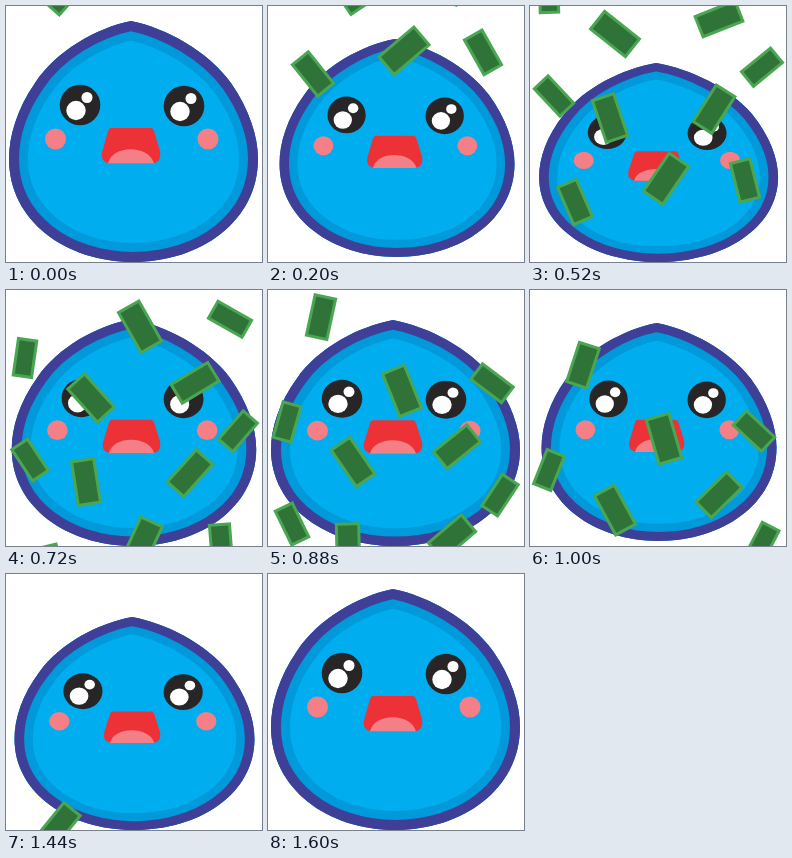
Write an HTML page with a canvas that moves like this. It is 256 by 256 pixels and loops after 1.68 s.

```html
<!DOCTYPE html>
<html lang="en">
<head>
<meta charset="utf-8">
<title>Bouncing drop in a rain of bills</title>
<style>
  html, body { margin: 0; width: 100%; height: 100%; overflow: hidden; background: #fff; }
  canvas { display: block; width: 100vw; height: 100vh; }
</style>
</head>
<body>
<canvas id="stage" width="256" height="256"></canvas>
<script>
const ctx = document.getElementById('stage').getContext('2d');
const SIZE = 256, LOOP = 1680, STEP = 40, LAST = 1600, BOUNCE = 800;
const FALL_SPEED = 0.4, SPIN = 0.12;
const BLUE = '#00aeef', RIM = '#0099da', OUTLINE = '#3f3f97', PINK = '#f47f86';

// Key poses of one bounce.
const POSES = [
  { at: 0, width: 249, height: 241, lift: 0 },
  { at: 80, width: 249, height: 226, lift: 0 },
  { at: 200, width: 235, height: 218, lift: 5 },
  { at: 320, width: 231, height: 224, lift: 30 },
  { at: 360, width: 231, height: 224, lift: 17 },
  { at: 520, width: 239, height: 199, lift: 0 },
  { at: 640, width: 240, height: 213, lift: 0 }
];
POSES.push({ ...POSES[0], at: BOUNCE });

// Each bill: column, time it crosses the top edge, tilt at y = 100.
const BILLS = [
  [45, 30, 55], [136, 88, -47], [215, 84, 67],
  [80, 240, 70], [184, 262, 122], [24, 295, 48], [232, 367, -44],
  [85, 450, 47], [189, 488, -32], [19, 550, 102],
  [134, 628, 68], [224, 647, 38], [53, 812, 111]
];

const DROP = new Path2D(
  'M125 15C160 22 202 45 225 77C243 103 252 130 252 153C252 215 195 256 127 256' +
  'C60 256 3 215 3 153C3 130 11 103 29 77C50 45 90 22 125 15Z');
const MOUTH = new Path2D('M105 122H145Q147 122 148 125L154 145Q156 157 145 157.5H104Q94 156 96 146L102 125Q103 122 105 122Z');
const TONGUE = new Path2D('M102 157.5C106 138.5 143 138.5 148 157.5Z');

const mix = (a, b, k) => a + (b - a) * k;

function poseAt(phase) {
  const next = POSES.findIndex(pose => pose.at > phase);
  const a = POSES[next - 1], b = POSES[next];
  const k = (phase - a.at) / (b.at - a.at);
  const value = name => mix(a[name], b[name], k);
  return { width: value('width'), height: value('height'), lift: value('lift') };
}

function dot(x, y, r, color) {
  ctx.fillStyle = color;
  ctx.beginPath();
  ctx.arc(x, y, r, 0, Math.PI * 2);
  ctx.fill();
}

function fillPath(path, color) {
  ctx.fillStyle = color;
  ctx.fill(path);
}

function insideStroke(width, color) {
  ctx.lineWidth = width * 2;
  ctx.strokeStyle = color;
  ctx.stroke(DROP);
}

function drawEye(x, y) {
  dot(x, y, 20.3, '#272526');
  dot(x - 4, y + 5.5, 9.7, '#fff');
  dot(x + 7, y - 7.5, 5.5, '#fff');
}

function drawDrop(phase) {
  const { width, height, lift } = poseAt(phase);
  const rest = POSES[0];
  ctx.save();
  // The drop drifts slightly right as it narrows.
  ctx.translate(127.5 + (rest.width - width) * 0.11, SIZE - lift);
  ctx.scale(width / rest.width, height / rest.height);
  ctx.translate(-127.5, -SIZE);

  ctx.save();
  ctx.clip(DROP);
  fillPath(DROP, BLUE);
  insideStroke(19, RIM);
  insideStroke(10, OUTLINE);
  ctx.restore();

  drawEye(74, 99);
  drawEye(178, 100);
  dot(49.5, 133, 10.5, PINK);
  dot(202, 133, 10.5, PINK);
  fillPath(MOUTH, '#ed3237');
  fillPath(TONGUE, PINK);
  ctx.restore();
}

function drawBill([x, start, tilt], t) {
  const y = FALL_SPEED * (t - start);
  const angle = tilt + Math.sign(tilt) * SPIN * (y - 100);
  // Bills are larger near the middle of the stage.
  const length = 37 + 12 * Math.sin(Math.PI * x / SIZE);
  const width = length * 0.54;
  ctx.save();
  ctx.translate(x, y);
  ctx.rotate(angle * Math.PI / 180);
  ctx.fillStyle = '#4aa651';
  ctx.fillRect(-length / 2, -width / 2, length, width);
  ctx.fillStyle = '#2f7339';
  ctx.fillRect(3 - length / 2, 3 - width / 2, length - 6, width - 6);
  ctx.restore();
}

function render(now) {
  const t = Math.min(LAST, Math.floor((now % LOOP) / STEP) * STEP);
  ctx.fillStyle = '#fff';
  ctx.fillRect(0, 0, SIZE, SIZE);
  drawDrop(t % BOUNCE);
  BILLS.forEach(bill => drawBill(bill, t));
}

const began = performance.now();
function tick() {
  render(performance.now() - began);
  requestAnimationFrame(tick);
}
tick();
</script>
</body>
</html>
```
